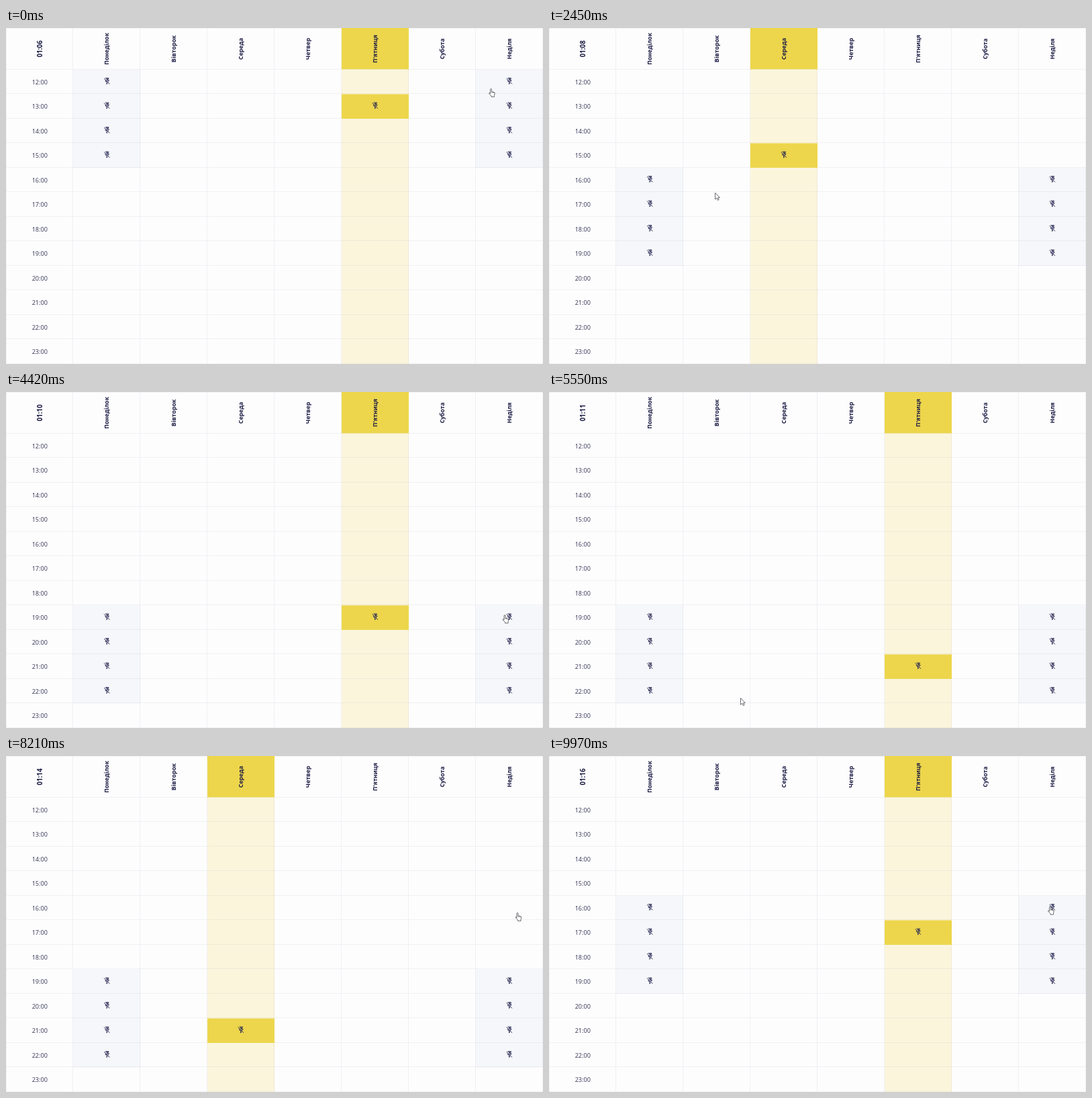
Write an HTML page that moves like this. It is 800 by 500 pixels and loops after 10000 ms.

```html
<!DOCTYPE html>
<html lang="uk">
<head>
<meta charset="utf-8">
<style>
html, body { margin: 0; width: 100%; height: 100%; overflow: hidden; background: #fdfdfe; }
svg { display: block; width: 800px; height: 500px; }
text { font-family: "Noto Sans", "Open Sans", sans-serif; text-anchor: middle; }
.hour { font-size: 9.1px; fill: #40405f; }
.head { font-size: 8.7px; font-weight: 700; fill: #1d1d45; }
#clock { font-size: 9.7px; }
.line { stroke: #26265a; stroke-opacity: .055; fill: none; }
.icon { stroke: #2c2c56; stroke-width: .95; fill: none; stroke-linejoin: round; }
.cursor { fill: #fff; stroke: #44444c; stroke-width: .8; stroke-linejoin: round; }
</style>
</head>
<body>
<svg viewBox="0 0 800 500">
  <defs>
    <g id="off" class="icon">
      <path d="M-2.6-4.4H2.6L1.2-1.2H3.2L1.3 1.4M-2.2-1.6V.6H-.4V4.6L1 2.4M-4.3-4L4 4.4"/>
      <path d="M-1.4-3.8H1.6L.4-.8H1.6L.8.4Z" fill="#2c2c56" stroke="none"/>
    </g>
  </defs>
  <rect width="800" height="500" fill="#fdfdfe"/>
  <g id="paddles"></g>
  <rect id="lane" y="62" width="100" height="438" fill="#fbf5dc"/>
  <path id="grid" class="line"/>
  <rect id="top" width="100" height="61.5" fill="#edd64c"/>
  <rect id="cell" width="100" height="36.5" fill="#edd64c"/>
  <g id="labels"></g>
  <text id="clock" class="head"></text>
  <use id="ball" href="#off"/>
  <g id="pointer" class="cursor">
    <path id="arrow" d="M.5.5V10.3L2.8 8.3 4.4 11.6 6 10.9 4.5 7.7H7.3Z"/>
    <g id="hand">
      <path d="M2.5 7.6V1.5Q2.5.4 3.5.4T4.5 1.5V4.8L8 5.6Q9.2 5.9 9.2 7.2L8.5 10.2V12.4H4V11L.7 7.6Q.2 6.5 1.3 6.5Z"/>
      <path d="M4.5 4.8V6.6M6.1 5.2V6.8M7.7 5.6V7" stroke-width=".6"/>
    </g>
  </g>
</svg>
<script>
const $ = id => document.getElementById(id);
const NS = "http://www.w3.org/2000/svg";
const LOOP = 10000, TOP = 62, ROW = 36.5, COL = 100;
const DAYS = ["Понеділок", "Вівторок", "Середа", "Четвер", "П'ятниця", "Субота", "Неділя"];

function add(parent, tag, attrs, text) {
  const el = document.createElementNS(NS, tag);
  for (const k in attrs) el.setAttribute(k, attrs[k]);
  if (text) el.textContent = text;
  parent.appendChild(el);
  return el;
}
const move = (el, x, y) => el.setAttribute("transform", `translate(${x} ${y})`);
const rowY = r => TOP + r * ROW;
const upright = (x, y) => `translate(${x} ${y}) rotate(-90)`;

// Static grid and labels
let grid = "M0 .5H800M0 499.5H800M.5 0V500M799.5 0V500";
for (let c = 1; c < 8; c++) grid += `M${c * COL - .5} 0V500`;
for (let r = 0; r < 12; r++) {
  grid += `M0 ${Math.floor(rowY(r)) - .5}H800`;
  add($("labels"), "text", { class: "hour", x: 50.3, y: rowY(r) + 21.6 }, `${12 + r}:00`);
}
$("grid").setAttribute("d", grid);
DAYS.forEach((day, i) =>
  add($("labels"), "text", { class: "head", transform: upright(153.4 + i * COL, 31) }, day));
$("clock").setAttribute("transform", upright(54, 31));

// Two paddles of four cells
for (const x of [100, 699.5]) {
  add($("paddles"), "rect", { x, width: 100.5, height: 4 * ROW, fill: "#f5f7fa" });
  for (let i = 0; i < 4; i++)
    add($("paddles"), "use", { href: "#off", x: x + 50.4, y: 17 + i * ROW });
}
// [time, top row]
const PADDLE = [[0, 0], [1720, 4], [3850, 7], [8560, 4]];

// Ball: one cell per step, each paddle hit shortens the step
const steps = [{ t: 0, c: 4, r: 1 }];
let c = 4, r = 1, dc = 1, dr = -1, wait = 600;
for (let t = 365; t < LOOP; t += wait) {
  c += dc;
  r += dr;
  steps.push({ t, c, r });
  if (c === 1 || c === 5) { dc = -dc; wait *= .975; }
  if (r === 0 || r === 11) dr = -dr;
}

// Pointer stops: time, x, y
const PATH = [
  [0, 719, 90], [200, 719, 90], [1330, 171, 231], [1520, 170.5, 231],
  [2075, 174, 232], [3742, 738, 330], [4120, 740, 332], [5090, 738, 330],
  [5550, 285, 455], [6300, 193, 437], [6640, 191.5, 435.5], [7060, 196, 430],
  [7830, 790, 270], [8190, 758.5, 233], [8600, 758, 231], [9250, 745, 225],
  [9700, 743, 223.5], [LOOP, 743, 223.5]
];
function pointerAt(t) {
  const i = PATH.findIndex(p => p[0] > t);
  const [t0, x0, y0] = PATH[i - 1], [t1, x1, y1] = PATH[i];
  const u = (t - t0) / (t1 - t0), e = u * u * (3 - 2 * u);
  return [x0 + (x1 - x0) * e, y0 + (y1 - y0) * e];
}

function draw(t) {
  const b = steps.filter(s => s.t <= t).pop();
  const x = (b.c + 1) * COL;
  $("lane").setAttribute("x", x);
  $("top").setAttribute("x", x);
  $("cell").setAttribute("x", x);
  $("cell").setAttribute("y", rowY(b.r));
  move($("ball"), x + 50, rowY(b.r) + 17);

  const row = PADDLE.filter(p => p[0] <= t).pop()[1];
  move($("paddles"), 0, rowY(row));

  const sec = 6 + Math.floor((t + 200) / 1000);
  $("clock").textContent = "01:" + String(sec).padStart(2, "0");

  const [px, py] = pointerAt(t);
  const onPaddle = py > TOP && (px > 700 || (px > 100 && px < 200));
  move($("pointer"), px, py);
  $("hand").style.display = onPaddle ? "" : "none";
  $("arrow").style.display = onPaddle ? "none" : "";
}

const start = performance.now();
function tick() {
  draw((performance.now() - start) % LOOP);
  requestAnimationFrame(tick);
}
draw(0);
requestAnimationFrame(tick);
</script>
</body>
</html>
```
